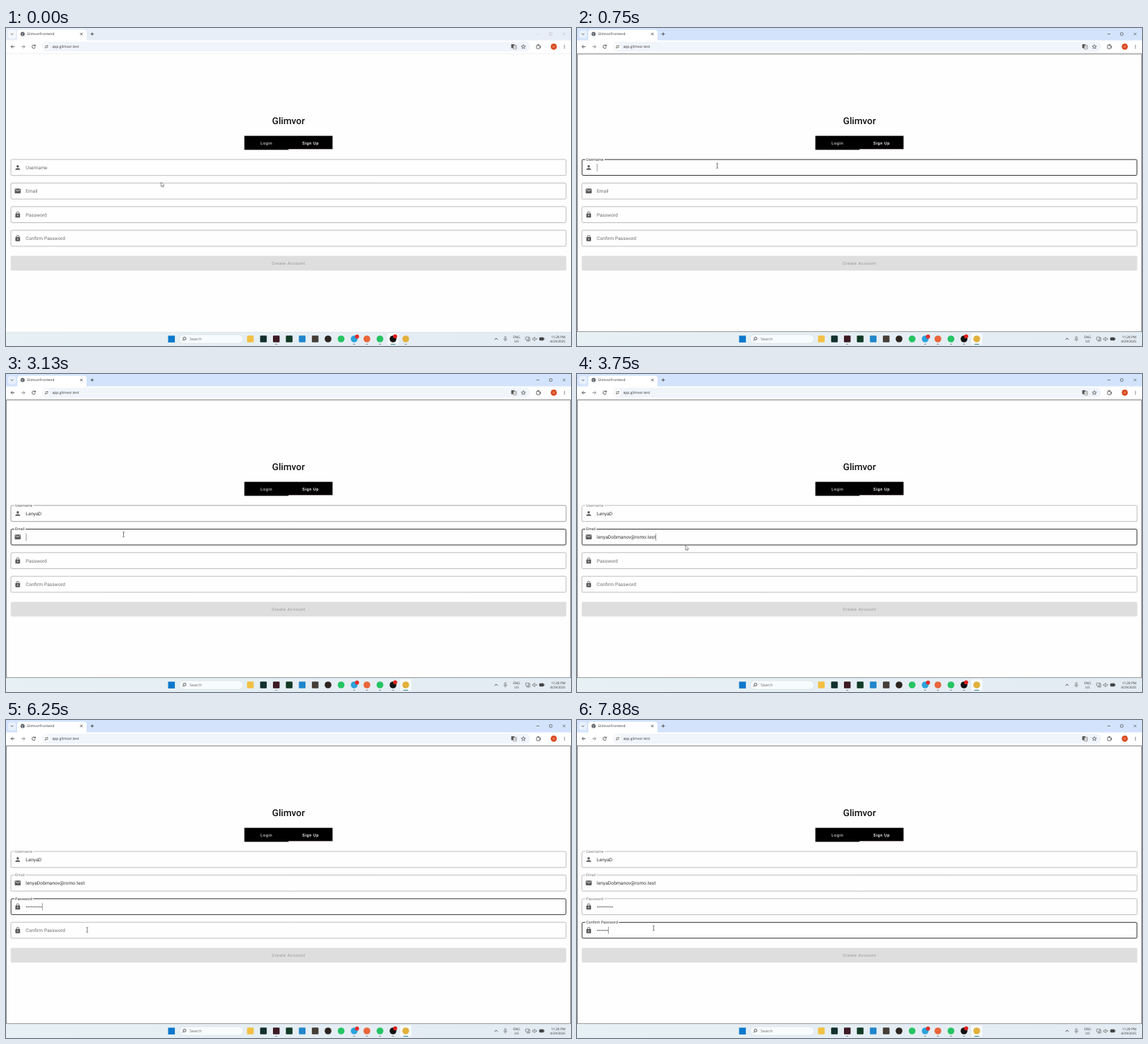
Animation, 800 px wide and 450 px high, one loop 8 s. Source, as an HTML page with a canvas:

```html
<!DOCTYPE html>
<html lang="en">
<head>
<meta charset="utf-8">
<title>Sign up form</title>
<style>
html, body { margin: 0; width: 100%; height: 100%; overflow: hidden; background: #fefefe; }
canvas { display: block; width: 800px; height: 450px; }
</style>
</head>
<body>
<canvas id="stage" width="800" height="450"></canvas>
<script>
const ctx = document.getElementById('stage').getContext('2d');
const LOOP = 8000, PAGE = '#fefefe';
const ROBOTO = 'Roboto, sans-serif', UI = '"Open Sans", sans-serif';
const TAU = Math.PI * 2;

const PERSON = 'M12 12c2.21 0 4-1.79 4-4s-1.79-4-4-4-4 1.79-4 4 1.79 4 4 4zm0 2c-2.67 0-8 1.34-8 4v2h16v-2c0-2.66-5.33-4-8-4z';
const MAIL = 'M20 4H4c-1.1 0-2 .9-2 2v12c0 1.1.9 2 2 2h16c1.1 0 2-.9 2-2V6c0-1.1-.9-2-2-2zm0 4l-8 5-8-5V6l8 5 8-5v2z';
const LOCK = 'M18 8h-1V6a5 5 0 0 0-10 0v2H6a2 2 0 0 0-2 2v10a2 2 0 0 0 2 2h12a2 2 0 0 0 2-2V10a2 2 0 0 0-2-2zM12 17a2 2 0 1 1 0-4 2 2 0 0 1 0 4zM9 8V6a3 3 0 0 1 6 0v2z';

// focus: when the field is clicked; keys: when each character arrives
const fields = [
  { label: 'Username', icon: PERSON, focus: 490, text: 'LenyaD', keys: [980, 1105, 1230, 1480, 1605, 1980] },
  { label: 'Email', icon: MAIL, focus: 3005, text: 'lenyaDobmanov@romo.test', paste: 3360 },
  { label: 'Password', icon: LOCK, focus: 3850, keys: [4605, 4730, 4855, 4980, 5105, 5355, 5480, 5605, 5855, 5980] },
  { label: 'Confirm Password', icon: LOCK, focus: 6890, keys: [7105, 7230, 7355, 7480, 7640, 7730, 7860] }
];
fields.forEach(f => f.path = new Path2D(f.icon));

// pointer legs: start, end, x, y
const legs = [
  [0, 0, 219.5, 218], [110, 480, 198.5, 195], [2250, 2990, 166.5, 227],
  [3640, 3880, 137.5, 262], [5400, 6230, 115, 297], [6260, 6740, 109.5, 295],
  [7640, 7860, 108.5, 294.5]
];

const clamp = v => Math.max(0, Math.min(1, v));
const ease = v => { v = clamp(v); return v * v * (3 - 2 * v); };
const mix = (a, b, k) => a + (b - a) * k;
const gray = v => `rgb(${v},${v},${v})`;

function text(s, x, y, size, color, o = {}) {
  ctx.font = `${o.weight || 400} ${size}px ${o.font || ROBOTO}`;
  ctx.letterSpacing = (o.gap || 0) + 'px';
  ctx.textAlign = o.align || 'left';
  ctx.fillStyle = color;
  ctx.fillText(s, x, y);
}
function rect(x, y, w, h, color) {
  ctx.fillStyle = color;
  ctx.fillRect(x, y, w, h);
}
function rounded(x, y, w, h, r, fill, stroke, width) {
  ctx.beginPath();
  ctx.roundRect(x, y, w, h, r);
  if (fill) { ctx.fillStyle = fill; ctx.fill(); }
  if (stroke) { ctx.strokeStyle = stroke; ctx.lineWidth = width; ctx.stroke(); }
}
function disc(x, y, r, color) {
  ctx.beginPath();
  ctx.arc(x, y, r, 0, TAU);
  ctx.fillStyle = color;
  ctx.fill();
}
function ring(x, y, r, color, width, from = 0, to = TAU) {
  ctx.beginPath();
  ctx.arc(x, y, r, from, to);
  ctx.strokeStyle = color;
  ctx.lineWidth = width;
  ctx.stroke();
}
function line(color, width, ...p) {
  ctx.beginPath();
  for (let i = 0; i < p.length; i += 2) ctx.lineTo(p[i], p[i + 1]);
  ctx.strokeStyle = color;
  ctx.lineWidth = width;
  ctx.stroke();
}

function star(x, y, r) {
  ctx.beginPath();
  for (let i = 0; i < 10; i++) {
    const a = i * Math.PI / 5 - Math.PI / 2, d = i % 2 ? r * 0.45 : r;
    ctx.lineTo(x + d * Math.cos(a), y + d * Math.sin(a));
  }
  ctx.closePath();
  ctx.strokeStyle = '#444';
  ctx.lineWidth = 0.7;
  ctx.stroke();
}

function browser(active) {
  const ink = '#333', pale = active ? '#333' : '#b0b3b8';
  rect(0, 0, 800, 18, active ? '#d3e3fb' : '#e7eef8');
  rounded(3, 3, 11, 11.5, 3.2, active ? '#e8f0fd' : '#f4f7fc');
  line(ink, 0.8, 6.8, 7.8, 8.5, 9.5, 10.2, 7.8);
  rounded(16, 2.6, 98, 18, 4, '#fff');
  rect(0, 17.5, 800, 18.7, '#fff');
  disc(23.5, 8.5, 2.9, '#50555b');
  line('#eef0f2', 0.7, 21.4, 7.3, 23.2, 8.2, 25.4, 6.9);
  line('#eef0f2', 0.7, 21.9, 10.1, 23.8, 9.6, 24.2, 10.9);
  text('GlimvorFrontend', 29.6, 10.3, 4.9, '#333', { font: UI });
  line(ink, 0.8, 105, 6.8, 108.4, 10.2);
  line(ink, 0.8, 108.4, 6.8, 105, 10.2);
  line(ink, 0.8, 119.7, 8.5, 124.3, 8.5);
  line(ink, 0.8, 122, 6.2, 122, 10.8);
  line(active ? '#333' : '#d3d8df', 0.6, 751, 8.5, 755, 8.5);
  rounded(769.5, 6.7, 3.6, 3.6, 0.6, null, pale, 0.6);
  line(pale, 0.6, 788.5, 6.7, 792, 10.2);
  line(pale, 0.6, 792, 6.7, 788.5, 10.2);

  line(ink, 0.8, 12, 26.4, 7.2, 26.4);
  line(ink, 0.8, 9.4, 24.1, 7.1, 26.4, 9.4, 28.7);
  line('#777', 0.8, 21.8, 26.4, 26.6, 26.4);
  line('#777', 0.8, 24.4, 24.1, 26.7, 26.4, 24.4, 28.7);
  ring(39.3, 26.4, 2.4, ink, 0.8, 0.3, 5.5);
  line(ink, 0.8, 41.7, 23.6, 41.7, 25.5, 39.8, 25.5);

  rounded(51, 19.6, 691, 13.6, 6.8, '#f0f4fb');
  disc(57.3, 26.4, 4.8, '#fff');
  line(ink, 0.6, 55, 25.2, 57.6, 25.2);
  ring(58.7, 25.2, 0.8, ink, 0.6);
  line(ink, 0.6, 57.2, 27.7, 59.7, 27.7);
  ring(56, 27.7, 0.8, ink, 0.6);
  text('app.glimvor.test', 65.5, 28.3, 5, '#333', { font: UI });

  rounded(715.4, 23, 4.6, 5.6, 0.6, '#555');
  rounded(718.3, 24.4, 4.4, 5.4, 0.6, '#fff', '#555', 0.6);
  text('文', 718.9, 28.4, 3.2, '#444', { font: '"Noto Sans CJK SC", sans-serif' });
  star(732.6, 26.6, 3.1);
  rounded(751.2, 24.2, 4.9, 5, 0.7, null, '#444', 0.8);
  disc(753.6, 23.9, 0.9, '#444');
  disc(756.4, 26.7, 0.9, '#444');
  disc(775.6, 26.4, 4.3, '#d9481c');
  text('D', 775.6, 28, 4.4, '#f6d9cf', { align: 'center' });
  for (let i = -1; i < 2; i++) disc(790.8, 26.4 + i * 1.9, 0.6, ink);

  if (active) rounded(0.4, 36.7, 799.2, 393.1, 0, null, '#444', 0.7);
  else rect(0, 35.8, 800, 0.6, '#dfe3e8');
}

function taskIcon(x, color, round) {
  if (round) disc(x, 440, 4.8, color);
  else rounded(x - 4.7, 435.3, 9.4, 9.4, 1.2, color);
}

function taskbar(active) {
  const glass = ctx.createLinearGradient(0, 0, 800, 0);
  glass.addColorStop(0, '#e7f1f4');
  glass.addColorStop(1, '#e3ebf3');
  rect(0, 430.2, 800, 19.8, glass);
  rect(0, 430.2, 800, 0.5, '#d3dbe2');
  rect(229.5, 435.4, 9.6, 9.6, '#0b78cc');
  rounded(245.4, 433.9, 90.4, 12.4, 6.2, '#f8fbfd', '#d2dae0', 0.6);
  ring(252.8, 439.4, 2, '#333', 0.8);
  line('#333', 0.8, 251.4, 440.9, 249.8, 442.6);
  text('Search', 260, 442.1, 5.4, '#666', { font: UI });

  const current = active ? 566 : 548;
  rounded(current - 8, 432, 16, 16, 1.8, '#f6fafc');
  const icons = [
    [346, '#f2c043'], [364.5, '#12302c'], [382.7, '#3c1a24'], [401, '#123a24'],
    [419.4, '#2086cb'], [437.8, '#463f37'], [456, '#2d2521', 1], [474.5, '#25c463', 1],
    [493, '#2ba3dd', 1], [511, '#e9653a', 1], [529.5, '#25c463', 1],
    [548, '#111', 1], [566, '#e2b13c', 1]
  ];
  for (const [x, color, round] of icons) taskIcon(x, color, round);
  disc(497, 436.7, 2.9, '#e0302c');
  disc(551, 436.3, 2.9, '#e0201c');
  for (const x of [382.7, 493, 511, 529.5, 548, 566]) {
    const on = x === current, w = on ? 7 : 3;
    rounded(x - w / 2, 446.9, w, 1.2, 0.6, on ? '#2f8791' : '#7d868c');
  }

  const ink = '#333';
  line(ink, 0.8, 691.8, 441.1, 694, 438.9, 696.2, 441.1);
  rounded(706, 436.6, 2, 4.2, 1, null, ink, 0.5);
  ring(707, 439.9, 2.2, ink, 0.4, 0, Math.PI);
  line(ink, 0.4, 707, 442.1, 707, 443.6);
  text('ENG', 723, 438.7, 4.7, ink, { font: UI, align: 'center' });
  text('US', 723, 445.3, 4.7, ink, { font: UI, align: 'center' });
  rounded(735.8, 437.3, 5, 4, 0.5, null, ink, 0.5);
  line(ink, 0.5, 737, 443, 740, 443);
  rounded(739.8, 438.6, 2, 4.4, 0.4, '#e5eef4', ink, 0.5);
  line(ink, 0.5, 745.8, 439, 747, 439, 748.8, 437.4, 748.8, 442.8, 747, 441.2, 745.8, 441.2, 745.8, 439);
  line(ink, 0.5, 750, 439.2, 751.8, 441);
  line(ink, 0.5, 751.8, 439.2, 750, 441);
  rounded(755.3, 438, 6, 3.9, 0.8, '#444', ink, 0.5);
  rect(761.7, 439.2, 0.7, 1.5, ink);
  text('11:28 PM', 792, 438.7, 4.7, ink, { font: UI, align: 'right' });
  text('4/29/2025', 792, 445.3, 4.6, ink, { font: UI, align: 'right' });
}

function heading() {
  text('Glimvor', 400, 135.9, 13.33, '#111', { weight: 500, align: 'center' });
  rect(337.5, 152.6, 62.5, 19.8, '#000');
  rect(400, 152.6, 62.4, 18.6, '#000');
  rect(400, 171.2, 62.4, 0.4, '#6a4a5e');
  text('Login', 368.8, 164.6, 5.83, '#c8c8c8', { weight: 500, gap: 0.52, align: 'center' });
  text('Sign Up', 431.3, 164.6, 5.83, '#fff', { weight: 500, gap: 0.52, align: 'center' });
}

function field(f, i, t) {
  const top = 185.7 + i * 33.4, mid = top + 11.7;
  const next = fields[i + 1];
  const started = t >= f.focus, left = next && t >= next.focus;
  const focused = started && !left;
  const up = ease((t - f.focus) / 115);
  const fade = left ? clamp((t - next.focus) / 300) : 1;
  const shade = focused ? 25 : Math.round(mix(60, 145, fade));
  const weight = focused ? 0.9 : 0.6;

  rounded(6.67 + weight / 2, top + weight / 2, 786.66 - weight, 23.3 - weight, 1.7, null, gray(shade), weight);

  ctx.save();
  ctx.translate(11.6, mid - 5.1);
  ctx.scale(10 / 24, 10 / 24);
  ctx.fillStyle = '#5c5c5c';
  ctx.fill(f.path, 'evenodd');
  ctx.restore();

  const size = mix(6.67, 5.35, up);
  if (up > 0) {
    ctx.font = `${size}px ${ROBOTO}`;
    ctx.letterSpacing = '0.06px';
    rect(11.7, top - 1, (ctx.measureText(f.label).width + 2.6) * up, 2.4, PAGE);
  }
  const tone = focused ? 50 : started ? Math.round(mix(60, 125, fade)) : 108;
  text(f.label, mix(28, 13, up), mix(mid + 2.5, top + 2.2, up), size, gray(tone), { gap: 0.06 });

  let end = 28.2, last = f.focus;
  if (f.text) {
    const typed = f.keys ? f.text.slice(0, f.keys.filter(k => t >= k).length) : t >= f.paste ? f.text : '';
    if (typed) {
      text(typed, 28, mid + 2.5, 6.67, '#333', { gap: 0.06 });
      end = 28 + ctx.measureText(typed).width;
    }
  } else {
    const n = f.keys.filter(k => t >= k).length;
    for (let d = 0; d < n; d++) disc(29.2 + d * 2.33, mid + 0.2, 0.72, '#222');
    end += n * 2.33;
  }
  for (const k of f.keys || [f.paste]) if (t >= k) last = k;
  if (focused && (t - last) % 1000 < 500) rect(end, mid - 5.2, 0.5, 10.4, '#444');
}

function pointer(t) {
  let [, , x, y] = legs[0];
  for (const [from, to, nx, ny] of legs.slice(1)) {
    const k = ease((t - from) / (to - from));
    x = mix(x, nx, k);
    y = mix(y, ny, k);
  }
  const inField = (y - 185.7) % 33.4 < 23.4;
  if (inField) {
    line('#444', 0.7, x, y - 3.2, x, y + 3.2);
    line('#444', 0.6, x - 1.4, y - 3.3, x + 1.4, y - 3.3);
    line('#444', 0.6, x - 1.4, y + 3.3, x + 1.4, y + 3.3);
  } else {
    ctx.save();
    ctx.translate(x, y);
    const p = new Path2D('M0 0V6.6L1.6 5.2L2.6 7.4L3.6 6.9L2.6 4.8H4.7Z');
    ctx.fillStyle = '#fff';
    ctx.fill(p);
    ctx.strokeStyle = '#555';
    ctx.lineWidth = 0.6;
    ctx.stroke(p);
    ctx.restore();
  }
}

function draw(t) {
  const active = t >= fields[0].focus;
  ctx.textRendering = 'geometricPrecision';
  rect(0, 0, 800, 450, PAGE);
  browser(active);
  heading();
  fields.forEach((f, i) => field(f, i, t));
  rounded(6.7, 322.4, 786.6, 20.8, 1.7, '#dedede');
  text('Create Account', 400, 335, 5.83, '#a3a3a3', { weight: 500, gap: 0.52, align: 'center' });
  taskbar(active);
  pointer(t);
}

const begin = performance.now();
function tick() {
  draw((performance.now() - begin) % LOOP);
  requestAnimationFrame(tick);
}
tick();
</script>
</body>
</html>
```
